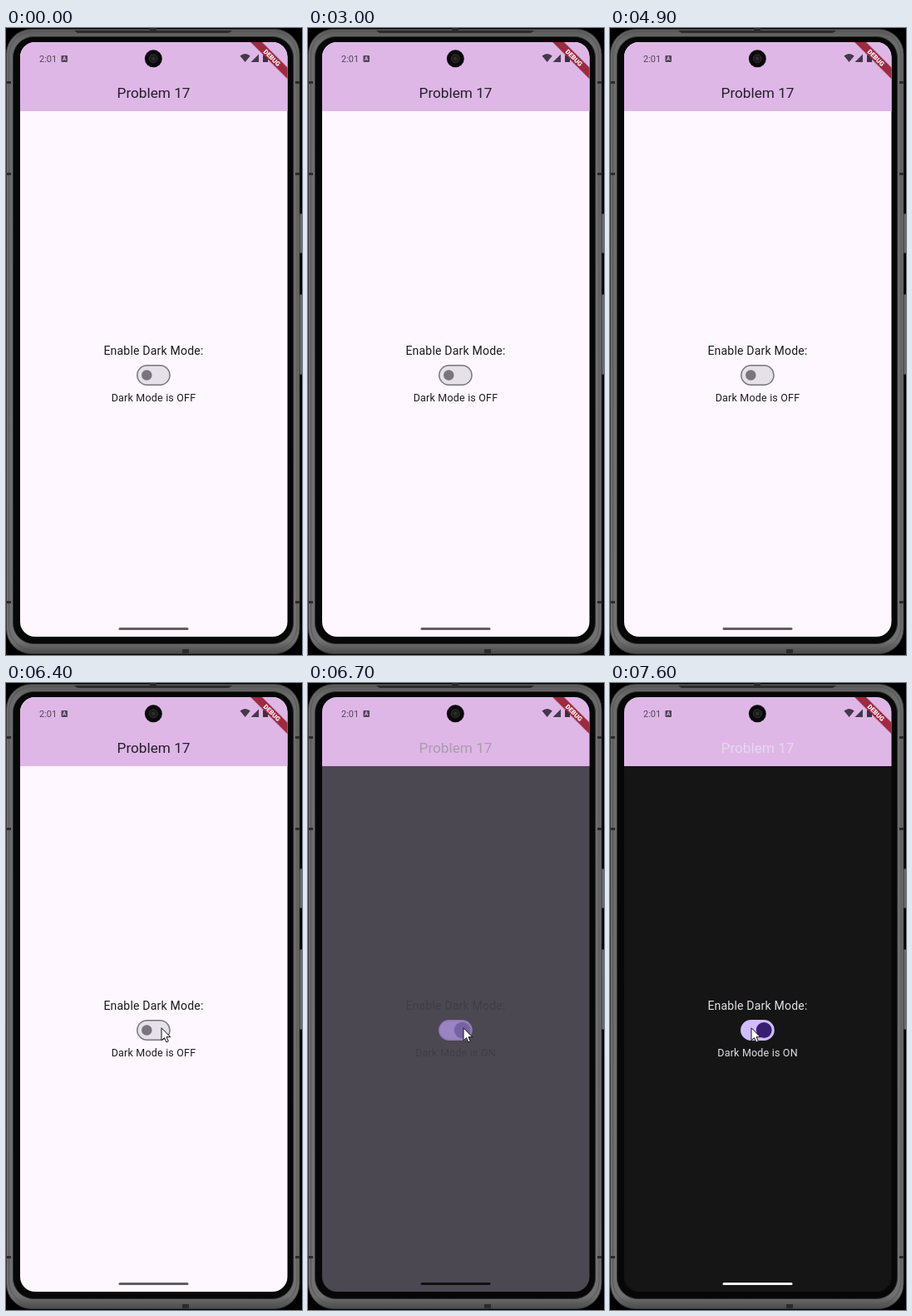
Animation of 356x754 px, one loop 8 s. Source, as an HTML page:

```html
<!DOCTYPE html>
<html lang="en">
<head>
<meta charset="utf-8">
<title>Dark mode switch</title>
<style>
  html, body { margin: 0; width: 100%; height: 100%; overflow: hidden; background: #000; }
  svg { display: block; width: 356px; height: 754px; font-family: Roboto, sans-serif; }
  .mid { text-anchor: middle; }
  .body { letter-spacing: .195px; }
</style>
</head>
<body>
<svg viewBox="0 0 356 754">
  <defs>
    <clipPath id="screen"><rect x="17" y="17" width="321.5" height="715" rx="18"/></clipPath>
    <linearGradient id="metal" x2="0" y2="1">
      <stop offset="0" stop-color="#5a5a5a"/><stop offset=".02" stop-color="#6a6a6a"/>
      <stop offset=".98" stop-color="#707070"/><stop offset="1" stop-color="#4a4a4a"/>
    </linearGradient>
  </defs>

  <!-- phone body -->
  <g fill="#6a6a6a" stroke="#3a3a3a">
    <rect x="350.5" y="223.5" width="7" height="47" rx="1.5"/>
    <rect x="350.5" y="320.5" width="7" height="96" rx="1.5"/>
  </g>
  <rect x=".5" y="1.5" width="352.5" height="751" rx="30" fill="url(#metal)" stroke="#3c3c3c"/>
  <rect x="3.5" y="4.5" width="346.5" height="743" rx="28" fill="none" stroke="#565656"/>
  <g fill="#2b2b2b">
    <path d="M82 3H272L268 6H86Z"/>
    <path d="M1 64h5v3h-5zM1 174h5v3h-5zM1 689h5v3h-5zM348 64h5v3h-5zM348 174h5v3h-5zM348 689h5v3h-5zM173 0h8v3h-8zM212 747h8v5h-8z"/>
  </g>
  <rect x="8.5" y="10.5" width="337" height="730" rx="25" fill="#070707" stroke="#2e2e2e"/>

  <g clip-path="url(#screen)">
    <rect id="page" x="17" y="17" width="322" height="716"/>
    <rect x="17" y="17" width="322" height="83" fill="#deb7e7"/>

    <!-- status bar -->
    <g fill="#514656">
      <text x="40" y="40.5" font-size="11">2:01</text>
      <rect x="66.5" y="33" width="7.5" height="8" rx="1"/>
      <path d="M281.5 33.5Q287.5 28.5 293.8 33.5L287.6 41ZM294.5 41 304 31.5V41Z" fill="#44394a"/>
      <path d="M309 32.5h1.5v-1h3v1h1.5v8.5h-6z" fill="#3b323f"/>
    </g>
    <text class="mid" x="70.2" y="39.3" font-size="6.5" font-weight="700" fill="#deb7e7">A</text>

    <text id="title" class="mid" x="177.5" y="84" font-size="17.2">Problem 17</text>

    <!-- corner ribbon -->
    <g transform="translate(338.7 17) rotate(45)">
      <rect x="-45" y="21.2" width="90" height="10.8" fill="#000" opacity=".16"/>
      <rect x="-45" y="21.9" width="90" height="9.4" fill="#a0293f"/>
      <text class="mid" y="29.4" font-size="7.8" font-weight="900" fill="#fff">DEBUG</text>
    </g>

    <g id="copy" class="mid body">
      <text x="177.5" y="392.8" font-size="14.06">Enable Dark Mode:</text>
      <text id="state" x="177.5" y="449.3" font-size="12.5"></text>
    </g>
    <rect id="track" x="157.8" y="405.7" width="39.2" height="23.6" rx="11.8" stroke-width="1.5"/>
    <rect id="thumb"/>
    <rect id="home" x="135.5" y="721" width="84" height="3" rx="1.5"/>
  </g>

  <!-- camera -->
  <circle cx="177.3" cy="36.8" r="10.5" fill="#090909"/>
  <circle cx="177.3" cy="36.8" r="5" fill="#1c1c1c" stroke="#303030"/>
  <circle cx="177.3" cy="36.8" r="2" fill="#303030"/>

  <path id="cursor" d="M.5.5V15.5L4 12.3 6.4 17.6 8.8 16.5 6.5 11.4H11.4Z" fill="#fff" stroke="#111"/>
</svg>
<script>
const $ = id => document.getElementById(id);
const LOOP = 8000, STEP = 100;

// Theme stops: thumb is [centre x, half width, half height]
const themes = [
  { t: 6500, page: '#fef7ff', title: '#251e29', copy: '#1d1b20', home: '#625c65',
    track: '#e6e0e9', edge: '#79747e', knob: '#79747e', thumb: [169.3, 6.25, 6.25] },
  { t: 6600, page: '#d6cfd8', title: '#423848', copy: '#201d23', home: '#514c54',
    track: '#b5afbd', edge: '#77717f', knob: '#746e7d', thumb: [177, 13, 8.6] },
  { t: 6700, page: '#4c4852', title: '#aa9bac', copy: '#403d44', home: '#111111',
    track: '#9a84c4', edge: '#8c78b4', knob: '#7562a2', thumb: [185.6, 9.8, 9.8] },
  { t: 7000, page: '#151515', title: '#e7d8ea', copy: '#e3dfe5', home: '#f6f4f7',
    track: '#d0bcff', edge: '#d0bcff', knob: '#381e72', thumb: [185.2, 9.4, 9.4] }
];

// Pointer visits: [time, x, y]; hidden outside each visit
const visits = [
  { end: 1900, path: [[1200, 32, 210], [1300, 286, 151], [1500, 286, 151], [1600, 237, 150],
                      [1700, 237, 150], [1800, 191, 145]] },
  { end: 4900, path: [[3400, 78, 347], [4000, 197, 477], [4200, 192, 439], [4800, 259, 569]] },
  { end: LOOP, path: [[5600, 290, 600], [6000, 194, 412], [6100, 194, 412], [6300, 185.5, 412],
                      [6400, 186.5, 414.3], [7100, 186.5, 414.3], [7600, 169.5, 414.3]] }
];

const lerp = (a, b, p) => a + (b - a) * p;
const rgb = hex => [1, 3, 5].map(i => parseInt(hex.slice(i, i + 2), 16));
const mix = (a, b, p) => `rgb(${rgb(a).map((v, i) => Math.round(lerp(v, rgb(b)[i], p)))})`;
const set = (id, attrs) => {
  for (const k in attrs) $(id).setAttribute(k, attrs[k]);
};

// Neighbouring stops around t and the progress between them
function span(list, t, time) {
  let i = 0;
  while (i < list.length - 2 && t >= time(list[i + 1])) i++;
  const a = list[i], b = list[i + 1];
  const p = (t - time(a)) / (time(b) - time(a));
  return [a, b, Math.min(1, Math.max(0, p)), i];
}

function drawTheme(t) {
  let [a, b, p, i] = span(themes, t, s => s.t);
  if (i === 2) p = 1 - (1 - p) ** 4;
  const tint = key => mix(a[key], b[key], p);
  for (const id of ['page', 'title', 'copy', 'home']) set(id, { fill: tint(id) });
  set('track', { fill: tint('track'), stroke: tint('edge') });
  const [x, w, h] = a.thumb.map((v, k) => lerp(v, b.thumb[k], p));
  set('thumb', { x: x - w, y: 417.5 - h, width: 2 * w, height: 2 * h, rx: h, fill: tint('knob') });
  $('state').textContent = `Dark Mode is ${t < 6600 ? 'OFF' : 'ON'}`;
}

function drawCursor(t) {
  const visit = visits.find(v => t >= v.path[0][0] && t < v.end);
  $('cursor').style.display = visit ? '' : 'none';
  if (!visit) return;
  const [a, b, p] = span(visit.path, t, k => k[0]);
  set('cursor', { transform: `translate(${lerp(a[1], b[1], p)} ${lerp(a[2], b[2], p)})` });
}

const start = performance.now();
function frame() {
  const now = (performance.now() - start) % LOOP;
  const t = Math.floor(now / STEP) * STEP;
  drawTheme(t);
  drawCursor(t);
  requestAnimationFrame(frame);
}
frame();
</script>
</body>
</html>
```
